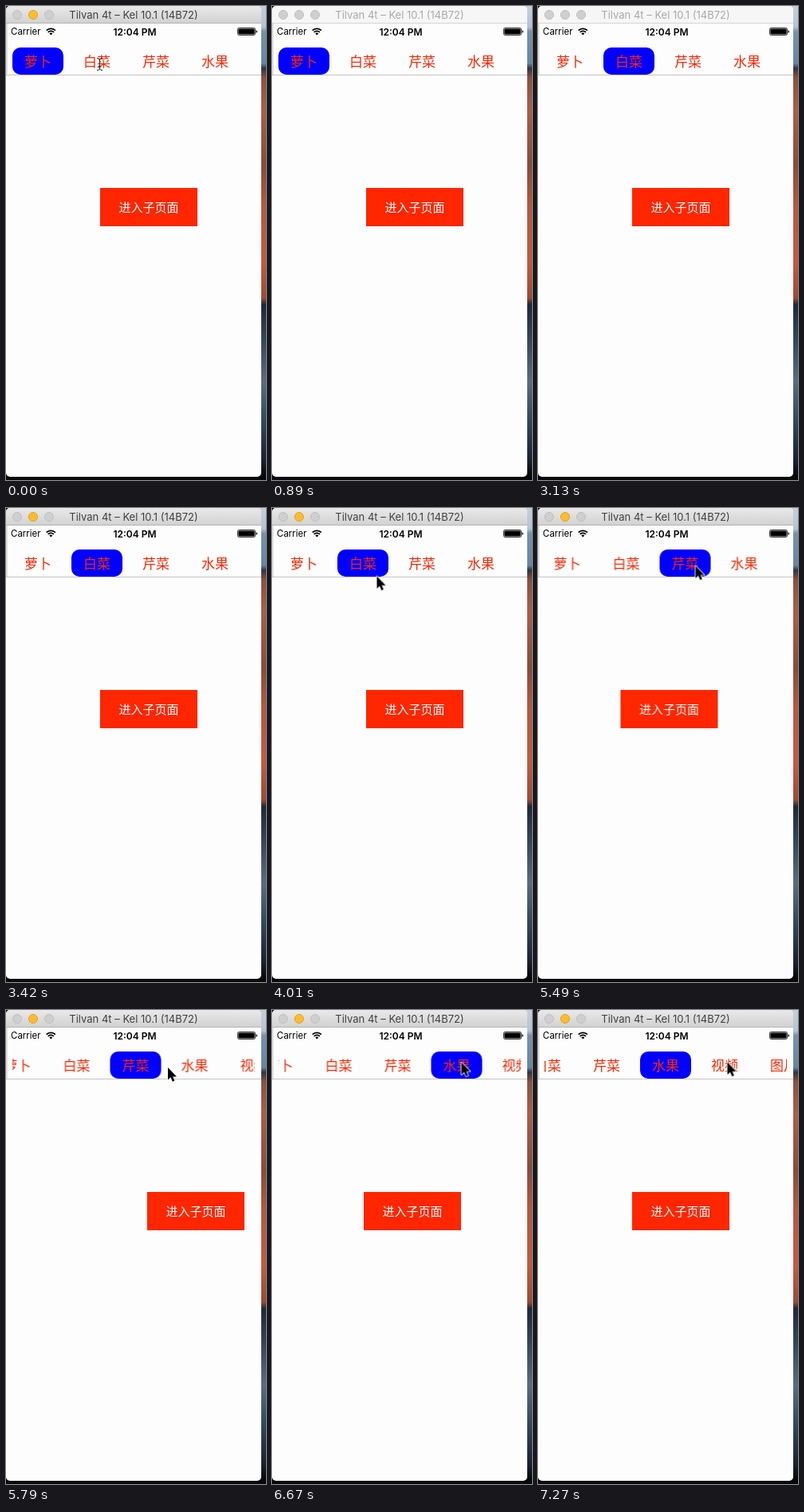
An HTML page that plays this animation: 326 by 594 pixels, repeating every 8 s.

```html
<!DOCTYPE html>
<html lang="zh-CN">
<head>
<meta charset="utf-8">
<title>Tab bar demo</title>
<style>
* { box-sizing: border-box; }
html, body { margin: 0; width: 100%; height: 100%; overflow: hidden; }
body { position: relative; font-family: Inter, "Liberation Sans", sans-serif; background: #07080a; }
body *, body *::after { animation-duration: 8s; animation-timing-function: step-end; animation-iteration-count: infinite; }
div, svg, .tabs span { position: absolute; }

.desk {
  left: 316px; top: 0; width: 10px; height: 594px;
  background: linear-gradient(#c3d0da 0, #b4c4d1 26px, #7791ab 32px, #6785a3 72px, #2e3642 78px,
    #8b5140 90px, #a85f49 130px, #8a4b3c 200px, #b3593f 250px, #c15b3e 320px, #9c4a36 366px,
    #1f2a39 374px, #36485c 420px, #5a6c80 470px, #33475d 520px, #18222f 570px, #07080a 588px);
}
.win { left: 0; top: 0; width: 320px; height: 590px; border-radius: 5px; background: #fdfdfd; overflow: hidden; }

.bar {
  left: 0; top: 0; width: 320px; height: 22px; border-bottom: 1px solid #b4b4b4;
  font-size: 13px; line-height: 22px; text-align: center; white-space: pre;
  color: #404040; background: linear-gradient(#e9e9e9, #d2d2d2); animation-name: focus;
}
.light { top: 5px; width: 12px; height: 12px; border-radius: 50%; background: #cfcfcf; border: 1px solid #bdbdbd; }
.amber { background: #fdbc2e; border-color: #e0a023; animation-name: amber; }

.edge { left: 0; top: 22px; width: 2px; height: 64px; background: #e0e0e0; }
.status { top: 25px; height: 15px; line-height: 15px; color: #000; white-space: pre; }
.tabs { left: 8px; top: 52px; width: 304px; height: 34px; overflow: hidden; }
.strip { left: 0; top: 0; width: 438px; height: 34px; animation-name: strip; }
.pill { left: 0; top: 0; width: 64px; height: 34px; border-radius: 10px; background: #00f; animation-name: pick; }
.tabs span {
  top: 0; width: 64px; left: calc(74px * var(--i)); text-align: center; color: #ff2600;
  font: 17px/34px "Noto Sans CJK SC", "Noto Sans CJK", sans-serif; white-space: nowrap;
}
.rule { left: 0; top: 86px; width: 320px; height: 1px; background: #c4c4c6; }
.pages { left: 0; top: 87px; width: 320px; height: 503px; overflow: hidden; }
.reel { left: 0; top: 0; width: 640px; height: 503px; animation-name: page; }
.btn {
  top: 141px; width: 122px; height: 48px; background: #ff2600; color: #fff; text-align: center;
  font: 15px/48px "Noto Sans CJK SC", "Noto Sans CJK", sans-serif; white-space: nowrap;
}
svg { overflow: visible; }
.beam { left: 117px; top: 73px; animation-name: beam; }
.arrow { left: 0; top: 0; animation-name: move; }

@keyframes focus {
  0%, 41% { color: #404040; border-color: #b4b4b4; background: linear-gradient(#e9e9e9, #d2d2d2); }
  1.875% { color: #a9a9a9; border-color: #d4d4d4; background: linear-gradient(#f6f6f6, #f6f6f6); }
  100% { color: #404040; border-color: #b4b4b4; background: linear-gradient(#e9e9e9, #d2d2d2); }
}
@keyframes amber {
  0%, 41%, 100% { background: #fdbc2e; border-color: #e0a023; }
  1.875% { background: #cfcfcf; border-color: #bdbdbd; }
}
@keyframes pick {
  0% { transform: none; }
  39.125% { transform: translateX(74px); }
  68.625% { transform: translateX(148px); }
  83.375%, 100% { transform: translateX(222px); }
}
@keyframes strip {
  0% { transform: none; }
  68.625% { transform: translateX(-3.5px); }
  70.5% { transform: translateX(-14.5px); }
  72.375% { transform: translateX(-25.5px); }
  74.125% { transform: translateX(-28px); }
  83.375% { transform: translateX(-30.5px); }
  85.25% { transform: translateX(-55px); }
  87.125% { transform: translateX(-87px); }
  89%, 100% { transform: translateX(-102px); }
}
/* both pages look alike, so the reel may restart at the first one */
@keyframes page {
  0% { transform: none; }
  68.625% { transform: translateX(-14.5px); }
  70.5% { transform: translateX(-118px); }
  72.375% { transform: translateX(-261px); }
  74.125% { transform: translateX(-320px); }
  83.375% { transform: translateX(-3px); }
  85.25% { transform: translateX(-93px); }
  87.125% { transform: translateX(-232px); }
  89% { transform: translateX(-319.5px); }
  90.875%, 100% { transform: translateX(-320px); }
}
@keyframes beam {
  0% { opacity: 1; }
  1.875%, 100% { opacity: 0; }
}
@keyframes move {
  0% { opacity: 0; transform: translate(116px, 72px); }
  1.875% { opacity: 1; transform: translate(116px, 72px); }
  11.125% { opacity: 0; transform: translate(116px, 72px); }
  42.875% { opacity: 1; transform: translate(186px, 400px); }
  44.625% { opacity: 1; transform: translate(160px, 290px); }
  46.375% { opacity: 1; transform: translate(142px, 218px); }
  50.125% { opacity: 1; transform: translate(131.5px, 85.5px); }
  52% { opacity: 1; transform: translate(134px, 84px); }
  53.875% { opacity: 1; transform: translate(141px, 82px); }
  55.75% { opacity: 1; transform: translate(153px, 79px); }
  57.625% { opacity: 1; transform: translate(168px, 76px); }
  59.5% { opacity: 1; transform: translate(182px, 74px); }
  61.25% { opacity: 1; transform: translate(193px, 73px); }
  63.125% { opacity: 1; transform: translate(197.5px, 72.5px); }
  72.375% { opacity: 1; transform: translate(203px, 72px); }
  74.125% { opacity: 1; transform: translate(214px, 70px); }
  76% { opacity: 1; transform: translate(229px, 67px); }
  77.875%, 100% { opacity: 1; transform: translate(237.5px, 65.5px); }
}
</style>
</head>
<body>
<div class="desk"></div>
<div class="win">
  <div class="bar">Tilvan 4t – Kel 10.1 (14B72)
    <div class="light" style="left:8px"></div>
    <div class="light amber" style="left:28px"></div>
    <div class="light" style="left:48px"></div>
  </div>
  <div class="edge"></div>

  <div class="status" style="left:6px;font-size:11.5px">Carrier</div>
  <svg style="left:50px;top:27px" width="13" height="10" fill="none" stroke="#000" stroke-width="1.7">
    <path d="M.7 3.6a8 8 0 0 1 11.2 0M2.7 5.8a5.1 5.1 0 0 1 7.2 0"/>
    <path d="M6.3 9.6 4.3 7.5a2.8 2.8 0 0 1 4 0z" fill="#000" stroke="none"/>
  </svg>
  <div class="status" style="left:101px;width:121px;text-align:center;font-size:12px;font-weight:600">12:04 PM</div>
  <svg style="left:290px;top:27px" width="26" height="10">
    <rect x=".5" y=".5" width="22" height="9" rx="1.8" fill="none" stroke="#000" stroke-width=".8"/>
    <rect x="1.4" y="1.4" width="20.2" height="7.2" rx="1"/>
    <path d="M23.6 3.2q1.5.4 1.5 1.8t-1.5 1.8z"/>
  </svg>

  <div class="tabs">
    <div class="strip">
      <div class="pill"></div>
      <span style="--i:0">萝卜</span>
      <span style="--i:1">白菜</span>
      <span style="--i:2">芹菜</span>
      <span style="--i:3">水果</span>
      <span style="--i:4">视频</span>
      <span style="--i:5">图片</span>
    </div>
  </div>
  <div class="rule"></div>

  <div class="pages">
    <div class="reel">
      <div class="btn" style="left:118px">进入子页面</div>
      <div class="btn" style="left:438px">进入子页面</div>
    </div>
  </div>
</div>

<svg class="beam" width="1" height="1" fill="none">
  <path id="ibeam" d="M-3 -7.5q3 0 3.5 1.5q.5-1.5 3.5-1.5M.5 -6v12M-3 7.5q3 0 3.5-1.5q.5 1.5 3.5 1.5M-1.5 3h4" stroke="#222" stroke-width="1"/>
</svg>
<svg class="arrow" width="12" height="18">
  <path d="M0 0v15.6l3.5-3.3 2.3 5.4 2.6-1.1-2.3-5.2h4.9z" stroke="#fff" stroke-width="1.6" stroke-linejoin="round" paint-order="stroke"/>
</svg>
</body>
</html>
```
